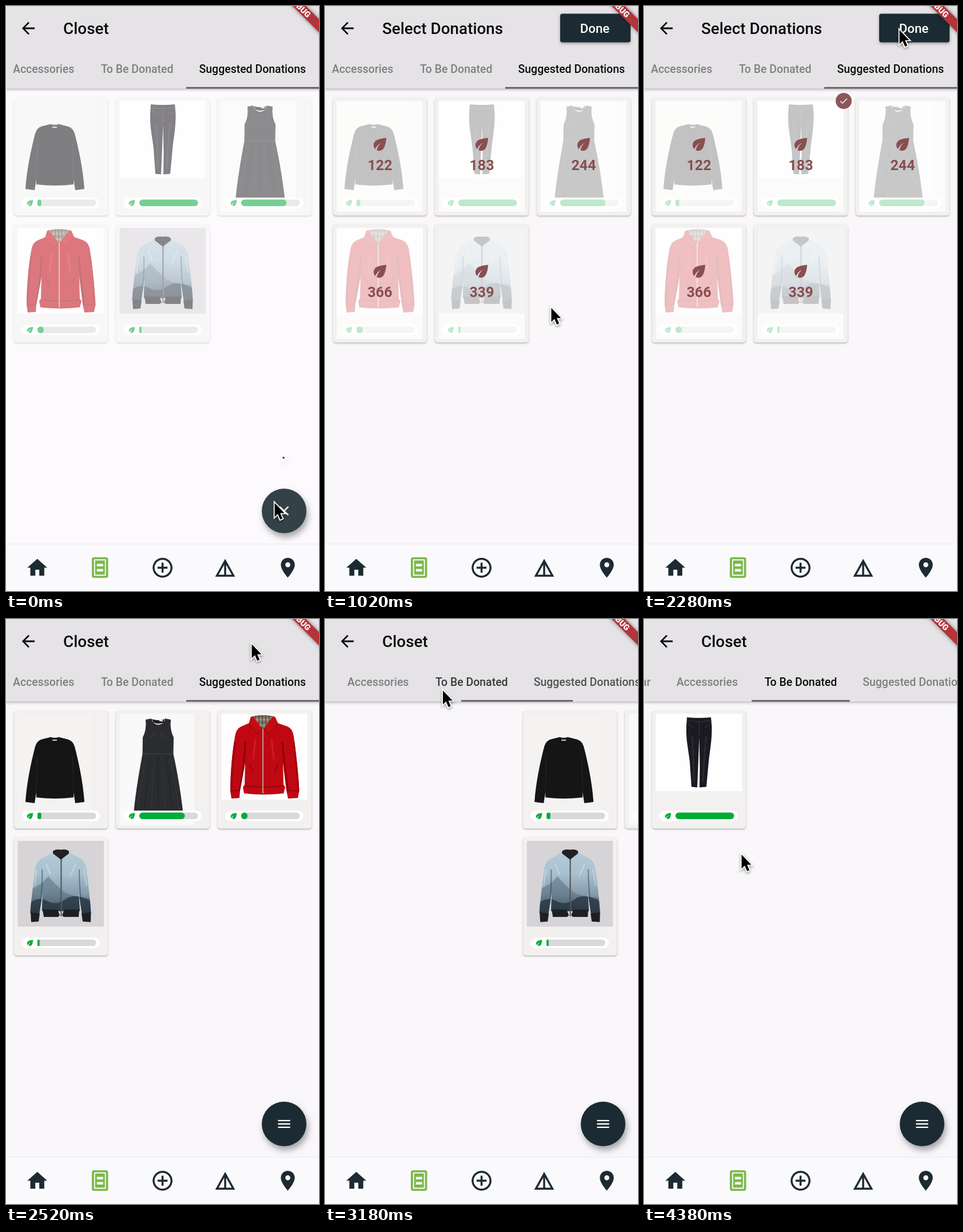
Recreate the animation shown at these times as an HTML page with a canvas. Size 547 px wide and 1023 px high, loop 4440 ms.

```html
<!DOCTYPE html>
<html lang="en">
<head>
<meta charset="utf-8">
<title>Closet</title>
<style>
html, body { margin: 0; width: 100%; height: 100%; overflow: hidden; background: #f9f7fa; }
canvas { display: block; width: 547px; height: 1023px; }
</style>
</head>
<body>
<canvas id="stage"></canvas>
<script>
const W = 547, H = 1023, LOOP = 4440, STEP = 60;
const BODY_TOP = 144, NAV_TOP = 940, DP = 1.392;
const DARK = '#1c2b33', GREEN = '#00ac36', BROWN = '#894f4f', CARD = '#f2f1ef', PAGE = '#f9f7fa';
const SELECT_AT = 540, PICK_AT = 1560, DONE_AT = 2400, TAB_AT = 3060;

const canvas = document.getElementById('stage');
const ctx = canvas.getContext('2d');
const ratio = window.devicePixelRatio || 1;
canvas.width = W * ratio;
canvas.height = H * ratio;

const icons = {
  back: 'M20 11H7.83l5.59-5.59L12 4l-8 8 8 8 1.41-1.41L7.83 13H20v-2z',
  home: 'M10 20v-6h4v6h5v-8h3L12 3 2 12h3v8z',
  add: 'M13 7h-2v4H7v2h4v4h2v-4h4v-2h-4V7zm-1-5C6.48 2 2 6.48 2 12s4.48 10 10 10 10-4.48 10-10S17.52 2 12 2zm0 18c-4.41 0-8-3.59-8-8s3.59-8 8-8 8 3.59 8 8-3.59 8-8 8z',
  tent: 'M12 3L2 21h20L12 3zm1 5.92L18.6 19H13V8.92zm-2 0V19H5.4L11 8.92z',
  pin: 'M12 2C8.13 2 5 5.13 5 9c0 5.25 7 13 7 13s7-7.75 7-13c0-3.87-3.13-7-7-7zm0 9.5a2.5 2.5 0 0 1 0-5 2.5 2.5 0 0 1 0 5z',
  menu: 'M3 18h18v-2H3v2zm0-5h18v-2H3v2zm0-7v2h18V6H3z',
  close: 'M19 6.41L17.59 5 12 10.59 6.41 5 5 6.41 10.59 12 5 17.59 6.41 19 12 13.41 17.59 19 19 17.59 13.41 12z',
  check: 'M9 16.17L4.83 12l-1.42 1.41L9 19 21 7l-1.41-1.41z',
  leaf: 'M6.05 8.05a7 7 0 0 0-.02 9.88c1.47-3.4 4.09-6.24 7.36-7.93A15.95 15.95 0 0 0 8 19.32c2.6 1.23 5.8.78 7.95-1.37C19.43 14.47 20 4 20 4S9.53 4.57 6.05 8.05z'
};
for (const k in icons) icons[k] = new Path2D(icons[k]);

const clamp = v => Math.max(0, Math.min(1, v));
const mix = (a, b, p) => a + (b - a) * p;
const smooth = p => p * p * (3 - 2 * p);
const gray = v => `rgb(${v},${v},${v})`;

function at(x, y, draw) {
  ctx.save();
  ctx.translate(x, y);
  draw();
  ctx.restore();
}

function icon(name, x, y, scale, color) {
  at(x, y, () => {
    ctx.scale(scale, scale);
    ctx.translate(-12, -12);
    ctx.fillStyle = color;
    ctx.fill(icons[name]);
  });
}

function box(x, y, w, h, color, r = 0) {
  ctx.fillStyle = color;
  ctx.beginPath();
  ctx.roundRect(x, y, w, h, r);
  ctx.fill();
}

function disc(x, y, r, color) {
  ctx.fillStyle = color;
  ctx.beginPath();
  ctx.arc(x, y, r, 0, 7);
  ctx.fill();
}

function shape(d, fill) {
  ctx.fillStyle = fill;
  ctx.fill(new Path2D(d));
}

function line(d, color, width = 1) {
  ctx.strokeStyle = color;
  ctx.lineWidth = width;
  ctx.stroke(new Path2D(d));
}

function inside(d, draw) {
  ctx.save();
  ctx.clip(new Path2D(d));
  draw();
  ctx.restore();
}

function text(s, x, y, size, weight, color, align = 'left') {
  ctx.font = `${weight} ${size}px Roboto, sans-serif`;
  ctx.textAlign = align;
  ctx.fillStyle = color;
  ctx.fillText(s, x, y);
}

function shadow(color, blur, dx, dy) {
  ctx.shadowColor = color;
  ctx.shadowBlur = blur * ratio;
  ctx.shadowOffsetX = dx * ratio;
  ctx.shadowOffsetY = dy * ratio;
}

function fade(y0, y1, ...colors) {
  const g = ctx.createLinearGradient(0, y0, 0, y1);
  colors.forEach((c, i) => g.addColorStop(i / (colors.length - 1), c));
  return g;
}

// Garments share the coordinates of a card whose corner is at 14,160.
function sweater() {
  box(20.5, 166, 130, 194, '#f4f3f2');
  shape('M78 206.5Q85 209 92 206.5L108 210.5Q117 213 120 223C127 250 135 287 137 320L121 322 118 303V312Q85 316 53 312V303L50 322 34 320C36 287 44 250 51 223Q54 213 62 210.5Z', '#151516');
  line('M55 240Q53 270 53 303M116 240Q118 270 118 303M78 207Q85 215 92 207', '#28282a');
  line('M81 212h8', '#c9c9c9', 2);
}

function pants() {
  box(20.5, 166, 150.5, 135, '#fefefe');
  shape('M75 172Q96 174 117 172L118.5 188C119 212 115 230 113 250L109 293.5 97 294.5 97.5 260 96.7 207 95.3 240 93 294.5 83 293.5 80 250C78 230 73 212 74 188Z', '#1b1a20');
  line('M75 178Q96 181 118 178M96.5 179V204M78 182Q81 189 87 189M115 182Q112 189 106 189', '#3b3941');
  line('M84 205Q87 235 87 285M109 205Q105 235 103 285', '#2a2932', 3);
}

function dress() {
  box(20.5, 166, 130, 194, '#f9f9f9');
  shape('M66 176L76 174Q79 184 88 185 98 184 100 174L110 176Q108 194 115 207L114.5 236C121 266 127 300 131 335H45.5C49 300 55 266 60.5 236L61 207Q68 194 66 176Z', '#2b2c2f');
  shape('M77 175Q88 179 99 175L97 181Q88 185 80 181Z', '#1b1b1d');
  box(90, 176, 6, 3, '#dddddd');
  line('M61 236H114M74 208L84 200M102 208L92 200', '#45464a');
  for (let i = 0; i < 7; i++) {
    const x = 67 + i * 7;
    line(`M${x} 238Q${x + (i - 3) * 2} 275 ${x + (i - 3) * 5} 332`, i % 2 ? '#222326' : '#37383c');
  }
}

function redJacket() {
  box(20.5, 166, 150.5, 150, '#fefefe');
  const coat = 'M72 171Q93 165 114 171L119 182 136 188Q145 192 147 206C151 235 155 270 156.5 301L154 313 137 314 134 300 128 252 129 290 132 294 129 305Q94 309 60 305L58 294 61 290 62 252 53 300 52 313 38 314 36 301C36 270 39 235 44 206Q46 192 55 188L69 182Z';
  shape(coat, '#c00812');
  inside(coat, () => {
    line('M62 215Q62 245 52 300M127 215Q129 245 137 300', '#8d0409', 3);
    line('M44 215Q39 255 38 300M148 215Q153 255 155 300', '#a10610', 4);
    line('M60 291Q94 297 130 291M37 301L53 300M136 300L156 301M69 252L76 270M120 252L113 270', '#8d0409', 1.5);
    line('M80 210L76 245M108 210L112 245', '#d01a23', 3);
  });
  inside('M74 171Q93 165 112 171L104 183 93 193 84 183Z', () => {
    box(70, 166, 48, 30, '#8f8170');
    for (let i = 0; i < 9; i++) {
      line(`M${68 + i * 6} 165V195`, i % 2 ? '#8f2b2d' : '#3d4c43', 1.5);
      line(`M70 ${166 + i * 5}H118`, i % 2 ? '#404d46' : '#c9b999', 1.2);
    }
  });
  shape('M72 171L76 171 92 192 83 201 68 184ZM114 171L110 171 94 192 104 201 120 184Z', '#c50b14');
  line('M92 192L83 201 69 184M94 192L104 201 119 184', '#86050a');
  line('M93 192V305', '#d9c5c1', 1.8);
  line('M93 192V305', '#716060', 0.6);
}

function bomber() {
  box(20.5, 166, 150.5, 150, '#d6d4d6');
  const coat = 'M82 186L96 198 110 186 130 197Q138 201 140 214C144 240 147 268 148.5 292L133 295 127 256 129 289H63L64 256 58 295 42.5 292C44 268 48 240 51 214Q53 202 62 197Z';
  shape(coat, fade(186, 296, '#b4cad7', '#a9c1cf', '#849cac', '#2f3e4a'));
  inside(coat, () => {
    shape('M40 252Q60 245 74 228 88 244 100 254T150 266V300H40Z', 'rgba(76,99,116,.45)');
    shape('M40 276Q56 262 72 271T104 268 150 272V300H40Z', 'rgba(34,46,57,.7)');
    line('M63 216Q64 240 60 285M128 216Q128 240 132 285', 'rgba(40,60,76,.5)', 2);
    line('M70 206L78 225M122 206L112 228M54 215L50 245M136 215L141 245', 'rgba(225,238,245,.45)', 2);
  });
  shape('M82 184Q87 179.5 96 181.5 105 179.5 110 184L110 188 97 198 95 198 82 188Z', '#202125');
  shape('M64 286H90L94 296 91 299H66ZM128 286H102L98 296 101 299H127ZM43 291L59 293 57 307 44 308ZM148.5 291L132 293 134 307 148 308Z', '#1e1f23');
  line('M96.5 198V298', '#35363b', 2);
  line('M97 200V298', '#b7a69d', 0.6);
}

const items = {
  sweater: { draw: sweater, level: .065, price: 122 },
  pants: { draw: pants, level: 1, price: 183 },
  dress: { draw: dress, level: .775, price: 244 },
  jacket: { draw: redJacket, level: .108, price: 366 },
  bomber: { draw: bomber, level: .036, price: 339 }
};

function card(item, slot, selecting) {
  const dx = slot % 3 * 178, dy = Math.floor(slot / 3) * 222;
  at(dx, dy, () => {
    ctx.save();
    shadow('rgba(0,0,0,.28)', 3, 0, 1.5);
    box(14, 160, 164, 206.5, CARD, 5);
    ctx.restore();
    item.draw();
    box(27, 335, 137, 18.5, '#fff', 9.2);
    icon('leaf', 42, 344.5, .66, GREEN);
    box(55, 338.5, 102.5, 11.5, '#d9d8db', 5.7);
    const w = 102.5 * item.level;
    box(55, 338.5, w, 11.5, GREEN, Math.min(w / 2, 5.7));
    if (!selecting) return;
    box(20.5, 166, 150.5, 194, 'rgba(255,255,255,.74)');
    icon('leaf', 96, 242, DP, BROWN);
    text(item.price, 96, 287, 18 * DP, 700, BROWN, 'center');
  });
}

function picked(t) {
  const p = (t - PICK_AT) / 330;
  if (p < 1) {
    ctx.save();
    ctx.beginPath();
    ctx.roundRect(192, 160, 164, 206.5, 5);
    ctx.clip();
    disc(319, 272, mix(16, 56, Math.sqrt(p)), `rgba(0,0,0,${.06 * (1 - p)})`);
    ctx.restore();
  }
  disc(349, 166, 14, '#8b5759');
  icon('check', 349, 166, .72, '#fff');
}

function suggested(t) {
  const selecting = t >= SELECT_AT && t < DONE_AT;
  const names = Object.keys(items).filter(n => n !== 'pants' || t < DONE_AT);
  names.forEach((n, i) => card(items[n], i, selecting));
  if (selecting && t >= PICK_AT) picked(t);
}

function header(t, tab) {
  ctx.fillStyle = fade(BODY_TOP, 151, 'rgba(0,0,0,.27)', 'rgba(0,0,0,.07)', 'rgba(0,0,0,0)');
  ctx.fillRect(0, BODY_TOP, W, 7);
  box(0, 0, W, 144.5, '#e5e3e6');
  icon('back', 39, 39, DP, '#0b0b0c');
  const selecting = t >= SELECT_AT && t < DONE_AT;
  text(selecting ? 'Select Donations' : 'Closet', 100, 48.5, 20 * DP, 500, '#0b0b0c');
  if (selecting) {
    ctx.save();
    shadow('rgba(0,0,0,.35)', 5, 0, 2);
    box(411, 13.5, 123, 50, DARK, 4);
    ctx.restore();
    text('Done', 471.5, 46.5, 16 * DP, 500, '#fff', 'center');
  }
  at(44.7 * tab, 0, () => {
    const size = 14 * DP;
    text('Footwear', -33, 116.5, size, 500, gray(128), 'right');
    text('Accessories', 65.6, 116.5, size, 500, gray(128), 'center');
    text('To Be Donated', 229.2, 116.5, size, 500, gray(mix(128, 12, tab)), 'center');
    text('Suggested Donations', 430.8, 116.5, size, 500, gray(mix(12, 128, tab)), 'center');
    const left = mix(315, 143.5, tab), right = mix(547, 314.8, tab);
    box(left, 141.7, right - left, 2.8, '#5d5b60');
  });
}

function ribbon() {
  at(W, 0, () => {
    ctx.rotate(Math.PI / 4);
    shadow('rgba(0,0,0,.5)', 7, 0, 0);
    box(-70, 16.3, 140, 16.2, '#b4343a');
    shadow('transparent', 0, 0, 0);
    text('DEBUG', .5, 29.5, 14.2, 900, '#fff', 'right');
  });
}

function cabinet() {
  const green = '#7cb84c', pale = '#f6f9f2';
  box(150, 964, 28.5, 36, green, 4);
  box(153.8, 967.6, 20.9, 28.8, pale, 1);
  box(155.8, 969.6, 16.9, 24.8, green);
  box(158.8, 975.5, 10.9, 4.5, pale);
  box(158.8, 984.5, 10.9, 4.5, pale);
}

function nav() {
  box(0, NAV_TOP, W, H - NAV_TOP, '#faf9fb');
  box(0, NAV_TOP, W, 1.5, '#efedf0');
  const s = 30 * DP / 24, y = 982.3;
  icon('home', 54.7, y, s, DARK);
  cabinet();
  icon('add', 273.6, y, s, DARK);
  icon('tent', 383, y, s, DARK);
  icon('pin', 492.5, y, s, DARK);
}

function button(x, y, r) {
  ctx.save();
  shadow('rgba(0,0,0,.34)', 11, 3, 7);
  disc(x, y, r, DARK);
  ctx.restore();
}

function buttons(t) {
  if (t >= SELECT_AT && t < DONE_AT) return;
  const open = t < SELECT_AT;
  button(486, 883, 39);
  if (open) disc(486, 883, 39, `rgba(255,255,255,${.1 * (1 - clamp(t / 240))})`);
  icon(open ? 'close' : 'menu', 486, 883, 1.18, '#fff');
  if (!open) return;
  const grow = clamp((t + 8) / 150);
  button(485, 790, 32 * grow);
  at(485, 790, () => {
    ctx.scale(grow, grow);
    text('$', 0, 10, 30, 600, '#fff', 'center');
  });
}

// Pointer stops: time, x, y
const stops = [
  [0, 469, 868], [60, 469, 868], [360, 475, 787], [600, 475, 787],
  [1440, 315, 267], [1740, 315, 267], [2280, 446, 41], [2400, 446, 41],
  [2520, 429, 43], [2580, 429, 43], [3000, 210, 115], [3120, 210, 115],
  [3480, 150, 237], [3720, 150, 237], [4320, 170, 411], [LOOP, 170, 411]
];

function pointer(t) {
  const i = stops.findIndex(s => s[0] > t);
  const a = stops[i - 1], b = stops[i];
  const p = smooth((t - a[0]) / (b[0] - a[0]));
  at(mix(a[1], b[1], p), mix(a[2], b[2], p), () => {
    const arrow = new Path2D('M.5 1V25.5L6 20.3 10.2 30 14.2 28.2 10.1 18.7H17.5Z');
    ctx.save();
    shadow('rgba(0,0,0,.4)', 4, 0, 2);
    ctx.strokeStyle = '#fff';
    ctx.lineWidth = 3.6;
    ctx.stroke(arrow);
    ctx.restore();
    ctx.fillStyle = '#000';
    ctx.fill(arrow);
  });
}

function scene(t) {
  ctx.setTransform(ratio, 0, 0, ratio, 0, 0);
  box(0, 0, W, H, PAGE);
  const tab = 1 - Math.pow(1 - smooth(clamp((t - TAB_AT) / 260)), 1.6);
  ctx.save();
  ctx.beginPath();
  ctx.rect(0, BODY_TOP, W, NAV_TOP - BODY_TOP);
  ctx.clip();
  if (tab < 1) at(W * tab, 0, () => suggested(t));
  if (tab > 0) at(W * (tab - 1), 0, () => card(items.pants, 0, false));
  if (t < SELECT_AT) {
    const veil = .77 * clamp((t + 215) / 365);
    box(0, BODY_TOP, W, NAV_TOP - BODY_TOP, `rgba(255,253,255,${veil})`);
  }
  ctx.restore();
  header(t, tab);
  ribbon();
  nav();
  buttons(t);
  box(0, 0, 1, H, 'rgba(255,255,255,.6)');
  pointer(t);
}

const start = performance.now();
function tick() {
  const t = (performance.now() - start) % LOOP;
  scene(Math.floor(t / STEP) * STEP);
  requestAnimationFrame(tick);
}
tick();
</script>
</body>
</html>
```
